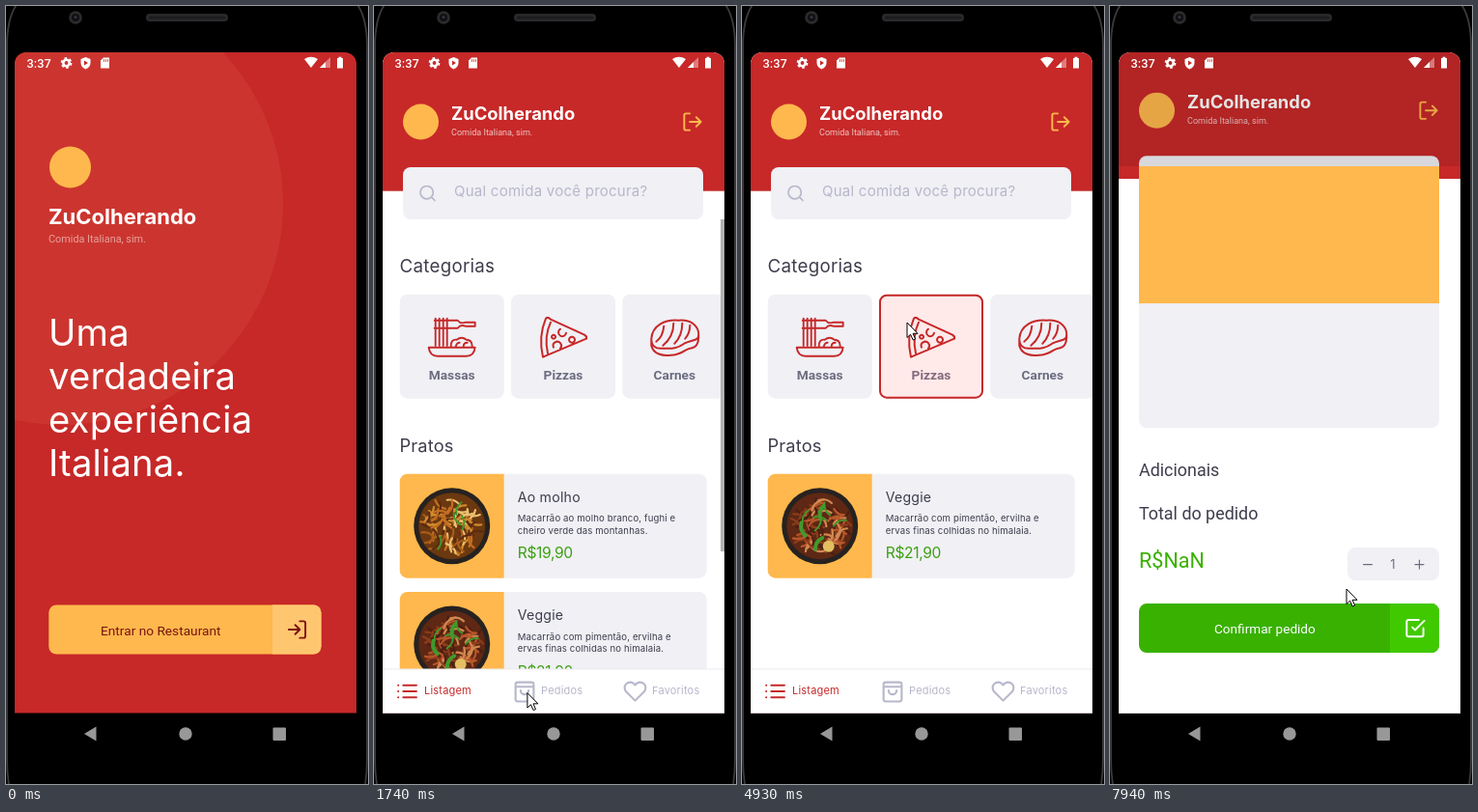
Animation of 375 by 806 pixels, one loop 7.99 s. Source, as an HTML page:

```html
<!DOCTYPE html>
<html lang="pt">
<head>
<meta charset="utf-8">
<title>Restaurante</title>
<style>
  html, body { margin: 0; width: 100%; height: 100%; overflow: hidden; background: #000; }
  svg { display: block; width: 375px; height: 806px; }
  text { font-family: Inter, sans-serif; white-space: pre; }
  .rb { font-family: Roboto, sans-serif; }
</style>
</head>
<body>
<svg id="stage" viewBox="0 0 375 806" xmlns="http://www.w3.org/2000/svg"></svg>
<script>
const LOOP = 7990, TOP = 48, HEIGHT = 685;
const RED = '#c72828', GOLD = '#ffb84d', PALE = '#f0f0f5', INK = '#3d3d4d', MUTED = '#b7b7cc', GREEN = '#39b100';
const BRAND = 'ZuColherando';

// ---------- markup helpers ----------
const rect = (x, y, w, h, fill, r = 0, more = '') =>
  `<rect x="${x}" y="${y}" width="${w}" height="${h}" rx="${r}" fill="${fill}" ${more}/>`;
const circle = (x, y, r, fill) => `<circle cx="${x}" cy="${y}" r="${r}" fill="${fill}"/>`;
const text = (x, y, size, fill, str, spacing = 0, more = '') =>
  `<text x="${x}" y="${y}" font-size="${size}" fill="${fill}" letter-spacing="${spacing}" ${more}>${str}</text>`;
const roboto = (x, y, size, fill, str, more = '') => text(x, y, size, fill, str, 0, 'class="rb" ' + more);
const line = (d, color, width = 2, more = '') =>
  `<path d="${d}" fill="none" stroke="${color}" stroke-width="${width}" stroke-linecap="round" stroke-linejoin="round" ${more}/>`;
const icon = (cx, cy, size, color, d) =>
  `<g transform="translate(${cx - size / 2} ${cy - size / 2}) scale(${size / 24})">${line(d, color)}</g>`;
// Solid rectangle rounded on one side only
const half = (x, y, w, h, r, fill, left) => left
  ? `<path d="M${x + w} ${y}H${x + r}a${r} ${r} 0 0 0-${r} ${r}v${h - 2 * r}a${r} ${r} 0 0 0 ${r} ${r}H${x + w}z" fill="${fill}"/>`
  : `<path d="M${x} ${y}h${w - r}a${r} ${r} 0 0 1 ${r} ${r}v${h - 2 * r}a${r} ${r} 0 0 1-${r} ${r}H${x}z" fill="${fill}"/>`;

const ICONS = {
  login: 'M15 3h4a2 2 0 0 1 2 2v14a2 2 0 0 1-2 2h-4M10 17l5-5-5-5M15 12H3',
  logout: 'M9 21H5a2 2 0 0 1-2-2V5a2 2 0 0 1 2-2h4M16 17l5-5-5-5M21 12H9',
  search: 'M19 11a8 8 0 1 1-16 0a8 8 0 1 1 16 0M21 21l-4.35-4.35',
  list: 'M8 6h13M8 12h13M8 18h13M3 6h.01M3 12h.01M3 18h.01',
  bag: 'M5 3h14a2 2 0 0 1 2 2v15a2 2 0 0 1-2 2H5a2 2 0 0 1-2-2V5a2 2 0 0 1 2-2zM3 7.5h18M16 11a4 4 0 0 1-8 0',
  heart: 'M20.84 4.61a5.5 5.5 0 0 0-7.78 0L12 5.67l-1.06-1.06a5.5 5.5 0 0 0-7.78 7.78L12 21.23l8.84-8.84a5.5 5.5 0 0 0 0-7.78z',
  check: 'M9 11l3 3L22 4M21 12v7a2 2 0 0 1-2 2H5a2 2 0 0 1-2-2V5a2 2 0 0 1 2-2h11'
};

function random(seed) {
  return () => (seed = (seed * 16807) % 2147483647) / 2147483647;
}

// Round pan filled with short curved strands
function pan(seed, base, tones, greens) {
  const rnd = random(seed);
  const strand = (color, width, reach) => {
    const a = rnd() * 6.28, d = Math.sqrt(rnd()) * reach, b = rnd() * 6.28;
    const x = 54 + Math.cos(a) * d, y = 54 + Math.sin(a) * d;
    const dx = Math.cos(b) * 7, dy = Math.sin(b) * 7;
    return line(`M${x - dx} ${y - dy}Q${x + dy * .6} ${y - dx * .6} ${x + dx} ${y + dy}`, color, width);
  };
  let out = circle(54, 54, 39.5, '#262220') + circle(54, 54, 34.5, base);
  for (let i = 0; i < 70; i++) out += strand(tones[i % tones.length], 2.2, 27);
  for (let i = 0; i < greens; i++) out += strand('#3f9a2c', i > 4 ? 4 : 1.8, 23);
  return out;
}

const DISHES = {
  sauce: ['Ao molho', 'Macarrão ao molho branco, fughi e', 'cheiro verde das montanhas.', 'R$19,90',
    pan(71, '#6b3810', ['#d08a2c', '#a85c18', '#ecc070', '#5c2a10', '#c46f20'], 4)],
  veggie: ['Veggie', 'Macarrão com pimentão, ervilha e', 'ervas finas colhidas no himalaia.', 'R$21,90',
    pan(293, '#5e2814', ['#b8562a', '#8d3c1a', '#d08850', '#4c1e10'], 8) + circle(63, 75, 6, '#e3bf62')]
};

function dish(key) {
  const [name, first, second, price, art] = DISHES[key];
  return half(108, 0, 210, 108, 8, PALE, false) + half(0, 0, 108, 108, 8, GOLD, true) + art +
    text(122, 29, 14.1, INK, name, .25) + text(122, 49.5, 9.6, INK, first, .13) +
    text(122, 62, 9.6, INK, second, .13) + text(122, 87.5, 15.6, '#3da010', price, -.35);
}

// ---------- category drawings ----------
const PASTA = line(
  'M37 25V53M41 25V53M45 25V53M49 25V53M36 27H60Q63 31 68 29H78V33H68Q63 31 60 35H36' +
  'M30 55H78Q77 64 69 64H39Q31 64 30 55zM53 54Q53 46 59 47Q64 43 69 47Q75 47 75 54M58 54Q59 50 62 50M66 54Q66 50 70 50', RED, 1.9);
const PIZZA = line(
  'M36 25Q28 44 33 65L78 46Q79 44 76 42L41 26Q38 23 36 25zM41 29Q34 44 38 61' +
  'M51 36a4 4 0 1 0 6 4M44 55a4.2 4.2 0 1 1 7 1M63 44a3 3 0 1 0 .1 0M44 42a2 2 0 1 0 .1 0', RED, 2);
const STEAK = line(
  'M30 46C31 32 44 26 58 27C72 26 79 33 79 42C79 49 70 47 64 51C56 57 50 56 42 56C34 57 30 53 30 46z' +
  'M30 47V53C32 62 42 64 50 63C62 63 64 57 70 56C77 55 79 51 79 42M35 49Q42 44 43 33M42 53Q53 44 53 30M54 51Q62 43 62 30M65 46Q70 40 70 32', RED, 2);

function tile(id, x, label, art) {
  return `<g id="${id}" transform="translate(${x} 298.7)">` + rect(0, 0, 108, 108, PALE, 8) +
    rect(1, 1, 106, 106, '#ffe9e9', 7, `class="on" stroke="${RED}" stroke-width="2"`) + art +
    roboto(54, 88.5, 13.7, '#6c6c80', label, 'font-weight="700" text-anchor="middle"') + '</g>';
}

const tab = (id, x, labelX, art, label) => {
  const draw = (state, color) => `<g id="${id}-${state}">` + icon(x, 710, 25, color, ICONS[art]) +
    text(labelX, 713, 11, color, label, .2) + '</g>';
  return draw('off', MUTED) + draw('on', RED);
};

// ---------- screens ----------
const home = rect(0, 30, 375, 740, RED) + circle(58, 205, 229, '#cc352f') + circle(66.5, 167, 21.5, GOLD) +
  text(44, 225.5, 22, '#fff', BRAND, 0, 'font-weight="700"') +
  roboto(44, 245, 10.85, '#e6a09c', 'Comida Italiana, sim.') +
  ['Uma', 'verdadeira', 'experiência', 'Italiana.'].map((s, i) => text(44, 352 + i * 45, 38.2, '#fff', s, .2)).join('') +
  rect(44.3, 620.5, 282.2, 51, GOLD, 8) + half(276, 620.5, 50.5, 51, 8, '#ffc670', false) +
  roboto(98, 651.5, 13.7, '#7c1212', 'Entrar no Restaurant') + icon(301.5, 646, 23, '#7c1212', ICONS.login) +
  rect(44.3, 620.5, 282.2, 51, '#000', 8, 'id="press"');

const list = rect(0, 40, 375, 151.7, RED) + circle(48.5, 120, 18.5, GOLD) +
  text(80, 118, 18.4, '#fff', BRAND, 0, 'font-weight="700"') +
  roboto(80, 134, 9.05, '#eec5c3', 'Comida Italiana, sim.') + icon(330, 120, 23, GOLD, ICONS.logout) +
  rect(30, 167, 311, 54, PALE, 8) + icon(55.5, 194, 20, MUTED, ICONS.search) +
  text(83, 196.5, 15, MUTED, 'Qual comida você procura?', .25) +
  text(26.5, 276, 18.7, INK, 'Categorias', .3) + `<g id="pratos">${text(26.5, 462, 18.2, INK, 'Pratos', .2)}</g>` +
  '<g id="tiles">' + tile('massas', 26.7, 'Massas', PASTA) + tile('pizzas', 142, 'Pizzas', PIZZA) +
  tile('carnes', 257.3, 'Carnes', STEAK) + '</g>' +
  `<g id="sauce">${dish('sauce')}</g><g id="veggie">${dish('veggie')}</g>` +
  rect(359, 221, 4, 344, '#b2b2b4', 0, 'id="bar"');

const orders = rect(0, 40, 375, 137.8, RED) + text(136, 117, 15, '#fff', 'Meus pedidos', .1) +
  `<g id="order" transform="translate(26.7 138)">${dish('sauce')}</g>`;

const tabs = rect(0, 687, 375, 60, '#fff') + rect(0, 686.5, 375, 1, '#ececf0') +
  tab('t1', 34.5, 52, 'list', 'Listagem') + tab('t2', 156, 173, 'bag', 'Pedidos') + tab('t3', 270.5, 288, 'heart', 'Favoritos');

const details = '<g transform="translate(0 -4.8)">' + rect(0, 30, 375, 740, '#fff') + rect(0, 30, 375, 149, RED) +
  rect(30, 120, 311, 317, PALE, 8) + rect(30, 120, 311, 188, GOLD) +
  roboto(30, 487, 17.9, INK, 'Adicionais') + roboto(30, 532, 17.9, INK, 'Total do pedido') +
  roboto(30, 582, 21.6, GREEN, 'R$NaN') + rect(246, 561, 95, 34, PALE, 8) +
  line('M262.5 578.5h9M316 578.5h9M320.5 574v9', '#6c6c80', 1.2) +
  text(293, 582.5, 13, '#6c6c80', '1', 0, 'text-anchor="middle"') +
  rect(30, 619, 311, 51, GREEN, 8) + half(290, 619, 51, 51, 8, '#41c900', false) +
  roboto(108, 650, 13.6, '#fff', 'Confirmar pedido') + icon(316, 644.5, 23, '#fff', ICONS.check) + '</g>';

const status = roboto(21.5, 63.5, 12.8, '#fff', '3:37', 'font-weight="500"') +
  '<circle cx="62.5" cy="59" r="3.2" fill="none" stroke="#fff" stroke-width="2.6"/>' +
  '<circle cx="62.5" cy="59" r="5" fill="none" stroke="#fff" stroke-width="1.8" stroke-dasharray="2.6 2.636"/>' +
  '<path d="M82.5 53l5 2v4q0 4-5 6.5q-5-2.5-5-6.5v-4z" fill="#fff"/>' +
  `<path d="M81 56.5l4 2.5-4 2.5z" fill="${RED}"/>` +
  '<path d="M101 53.5h6v11h-9v-8z" fill="#fff"/>' + line('M101.5 55.5v2M103.5 55.5v2M105.5 55.5v2', RED, .8) +
  '<path d="M309 55q7-4.5 14 0l-7 9z" fill="#fff"/>' +
  '<path d="M336 53v11h-11z" fill="#fff" opacity=".4"/><path d="M331 58v6h-6z" fill="#fff"/>' +
  '<path d="M343 54h1.5v-1.2h3V54h1.5v10.5h-6z" fill="#fff"/>';

const phone = rect(0, 0, 375, 806, '#000') +
  line('M13-4Q1 10 1 42V780Q1 796 3.5 810M362-4Q374 10 374 42V780Q374 796 371.5 810', '#3b3b3d', 1.8) +
  circle(72, 12, 6.8, '#2b2b2d') + circle(72, 12, 4, '#101014') + circle(72, 11.5, 1.6, '#30343e') +
  rect(145, 8, 85, 8, '#2a2a2c', 4) + rect(148, 10.5, 79, 3, '#1c1c1e', 1.5) +
  '<path d="M81 754l12.5-7.5v15z" fill="#989898"/>' + circle(186, 754, 6.7, '#989898') + rect(276.5, 747.5, 13.5, 13.5, '#989898', 1);

const shade = id => rect(0, 30, 375, 740, '#000', 0, `id="${id}"`);
document.getElementById('stage').innerHTML =
  `<defs><clipPath id="glass"><path d="M9 732.5V60a12 12 0 0 1 12-12H351a12 12 0 0 1 12 12V732.5z"/></clipPath>
   <clipPath id="clipA"><rect id="cutA" width="375" height="806"/></clipPath>
   <clipPath id="clipB"><rect id="cutB" width="375" height="806"/></clipPath></defs>` + phone +
  `<g clip-path="url(#glass)"><g id="home">${home}</g>${shade('shadeA')}
   <g clip-path="url(#clipA)"><g id="app">${rect(0, 30, 375, 740, '#fff')}<g id="list">${list}</g><g id="orders">${orders}</g>${tabs}</g></g>
   ${shade('shadeB')}<g clip-path="url(#clipB)"><g id="details">${details}</g></g>${status}</g>
   <path id="cursor" d="M0 0V15.5L3.6 12.2L6.2 18L8.6 17L6.1 11.3H11z" fill="#fff" stroke="#000" stroke-width="1" stroke-linejoin="round"/>`;

// ---------- timeline ----------
const el = {};
document.querySelectorAll('[id]').forEach(n => el[n.id] = n);
const show = (id, on) => el[id].style.display = on ? '' : 'none';
const move = (id, x, y) => el[id].setAttribute('transform', `translate(${x} ${y})`);
const fade = (id, v) => el[id].setAttribute('opacity', v);
const clamp = v => Math.max(0, Math.min(1, v));
const stepAt = (t, steps) => steps.reduce((now, [at, v]) => t >= at ? v : now, null);

const POINTER = [
  [80, 234, 812], [600, 226, 655], [820, 228, 657], [890, 228, 657], [900, 216, 652], [1170, 216, 652],
  [1330, 193, 735], [1430, 178, 754], [1660, 160, 712], [1920, 155, 710], [2100, 155, 710], [2540, 275, 710],
  [2710, 275, 710], [3050, 180, 700], [3390, 78, 706], [3600, 78, 706], [4080, 169, 296], [4240, 169, 296],
  [4440, 171, 328], [5480, 171, 328], [5940, 96, 352], [7000, 96, 352], [7220, 245, 570], [7780, 245, 570], [7940, 245, 604]
];
const FILTER = [[1600, 'all'], [4720, 'pizzas'], [5380, 'all'], [6260, 'massas']];
const CHOSEN = [[4640, 'pizzas'], [5320, ''], [6190, 'massas']];

function pointer(t) {
  const i = POINTER.findIndex(p => p[0] > t);
  if (i < 0) return POINTER[POINTER.length - 1].slice(1);
  if (i === 0) return POINTER[0].slice(1);
  const [t0, x0, y0] = POINTER[i - 1], [t1, x1, y1] = POINTER[i];
  const k = (1 - Math.cos(Math.PI * (t - t0) / (t1 - t0))) / 2;
  return [x0 + (x1 - x0) * k, y0 + (y1 - y0) * k];
}

// cubic-bezier(.35, .45, 0, 1)
function reveal(x) {
  x = clamp(x);
  let lo = 0, hi = 1, s;
  for (let i = 0; i < 24; i++) {
    s = (lo + hi) / 2;
    if (1.05 * (1 - s) ** 2 * s + s ** 3 < x) lo = s; else hi = s;
  }
  return 1.35 * (1 - s) ** 2 * s + 3 * (1 - s) * s * s + s ** 3;
}

function enter(t, start, next, prev, key) {
  const p = t < start ? 0 : reveal((t - start) / 425), rest = (1 - p) * HEIGHT;
  show(next, t >= start);
  move(next, 0, rest * .041);
  move(prev, 0, -p * HEIGHT * .0208);
  el['cut' + key].setAttribute('y', Math.round(TOP + rest));
  fade('shade' + key, Math.min(.1, p / 3.6));
}

// Tap feedback: dims to 60 % and recovers
const tap = (t, at) => {
  const d = t - at;
  return 1 - .4 * (d < 100 ? clamp(d / 100) : clamp((250 - d) / 150));
};

function render(t) {
  t = Math.min(t, 7940);
  enter(t, 1158, 'app', 'home', 'A');
  if (t >= 7780) enter(t, 7787, 'details', 'app', 'B');
  else { show('details', false); fade('shadeB', 0); }

  fade('press', .1 * Math.min(clamp((t - 600) / 80), clamp((820 - t) / 120)));

  const inOrders = t >= 2070 && t < 3550;
  show('list', !inOrders);
  show('orders', inOrders);
  show('order', t >= 2250);
  ['t1', 't2', 't3'].forEach((id, i) => {
    const on = i === (inOrders ? 1 : 0);
    show(id + '-on', on);
    show(id + '-off', !on);
  });

  const filter = stepAt(t, FILTER), chosen = stepAt(t, CHOSEN), loaded = t >= 1550;
  show('tiles', loaded);
  move('pratos', 0, loaded ? 0 : -108);
  for (const id of ['massas', 'pizzas', 'carnes']) {
    el[id].querySelector('.on').style.display = chosen === id ? '' : 'none';
    el[id].querySelector('text').setAttribute('fill', chosen === id ? '#84697b' : '#6c6c80');
  }
  fade('pizzas', Math.min(tap(t, 4470), tap(t, 5200)));
  fade('massas', tap(t, 6050));
  fade('sauce', tap(t, 7180));
  show('sauce', filter === 'all' || filter === 'massas');
  show('veggie', filter === 'all' || filter === 'pizzas');
  move('sauce', 26.7, 484.7);
  move('veggie', 26.7, filter === 'pizzas' ? 484.7 : 607);
  fade('bar', t < 1600 ? 0 : clamp((4500 - t) / 250));

  const [x, y] = pointer(t);
  move('cursor', x, y);
}

const begin = performance.now();
function tick(now) {
  render(Math.max(0, now - begin) % LOOP);
  requestAnimationFrame(tick);
}
render(0);
requestAnimationFrame(tick);
</script>
</body>
</html>
```
